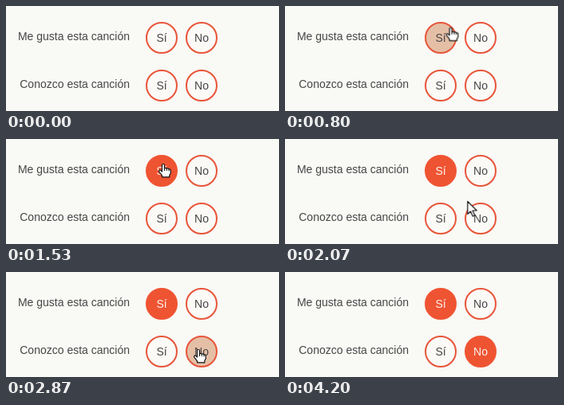
Write an HTML page that moves like this. It is 342x132 px and loops after 4470 ms.

```html
<!DOCTYPE html>
<html lang="es">
<head>
<meta charset="utf-8">
<title>Encuesta de canciones</title>
<style>
  html, body { margin: 0; width: 100%; height: 100%; overflow: hidden; background: #f9f9f5; }
  svg { display: block; width: 342px; height: 132px; }
  text { font: 14px "Liberation Sans", Arial, sans-serif; fill: #464648; }
  .label { text-anchor: end; }
  .btn text { text-anchor: middle; }
  .btn circle { fill: #fbfaf6; stroke: #e8553a; stroke-width: 2; }

  .btn *, #cursor, #cursor * { animation: 4470ms step-end infinite; }
  .like circle { animation-name: like; }
  .like text { animation-name: like-text; }
  .know circle { animation-name: know; }
  .know text { animation-name: know-text; }
  #cursor { animation-name: move; animation-timing-function: linear; }
  #cursor path { stroke: #111; stroke-linejoin: round; fill: #fff; }
  #cursor .arrow { animation-name: arrow; }
  #cursor .hand { animation-name: hand; }

  /* Hover, then click */
  @keyframes like {
    17.56% { fill: #e4bfa6; }
    31.3%, 100% { fill: #ef5432; stroke: #ef5432; }
  }
  @keyframes like-text { 31.3%, 100% { fill: #fff4ee; } }
  @keyframes know {
    47.7% { fill: #e4bfa6; }
    67.1%, 100% { fill: #ef5432; stroke: #ef5432; }
  }
  @keyframes know-text { 67.1%, 100% { fill: #fff4ee; } }

  @keyframes move {
    0%, 1.5% { transform: translate(291px, 0); }
    11.86% { transform: translate(238px, 8px); }
    13.42% { transform: translate(229px, 18px); }
    20.13%, 36.6% { transform: translate(197px, 31px); }
    50.3%, 100% { transform: translate(241px, 97px); }
  }
  @keyframes arrow {
    0% { opacity: 0; }
    1.5% { opacity: 1; }
    17.56% { opacity: 0; }
    40.95% { opacity: 1; }
    47.7%, 100% { opacity: 0; }
  }
  @keyframes hand {
    0% { opacity: 0; }
    17.56% { opacity: 1; }
    40.95% { opacity: 0; }
    47.7% { opacity: 1; }
    78.3%, 100% { opacity: 0; }
  }
</style>
</head>
<body>
<svg viewBox="0 0 342 132">
  <text class="label" x="155" y="43">Me gusta esta canción</text>
  <g class="btn like"><circle cx="195" cy="40" r="19"/><text x="195" y="45">Sí</text></g>
  <g class="btn"><circle cx="245" cy="40" r="19"/><text x="245" y="45">No</text></g>

  <text class="label" x="155" y="103">Conozco esta canción</text>
  <g class="btn"><circle cx="195" cy="100" r="19"/><text x="195" y="105">Sí</text></g>
  <g class="btn know"><circle cx="245" cy="100" r="19"/><text x="245" y="105">No</text></g>

  <g id="cursor">
    <path class="arrow" stroke-width="1.2" d="M.5 .5V16.5L4.2 13L7 19.3L9.6 18.2L6.8 12H12Z"/>
    <g class="hand">
      <path stroke-width="1.2" d="M-1.5 10V1.8Q-1.5 .5 0 .5T1.5 1.8V6Q3 4.8 4.3 6.3Q6 5.3 7 7Q9.3 6.6 9.3 8.8V12L7.8 14.5V16.8H-1.5V14.8L-5 10.3Q-5.9 8.6-4.5 8Q-3.4 7.8-1.5 10Z"/>
      <path d="M1.5 6V9M4.3 6.5V9M7 7.2V9.4"/>
    </g>
  </g>
</svg>
</body>
</html>
```
